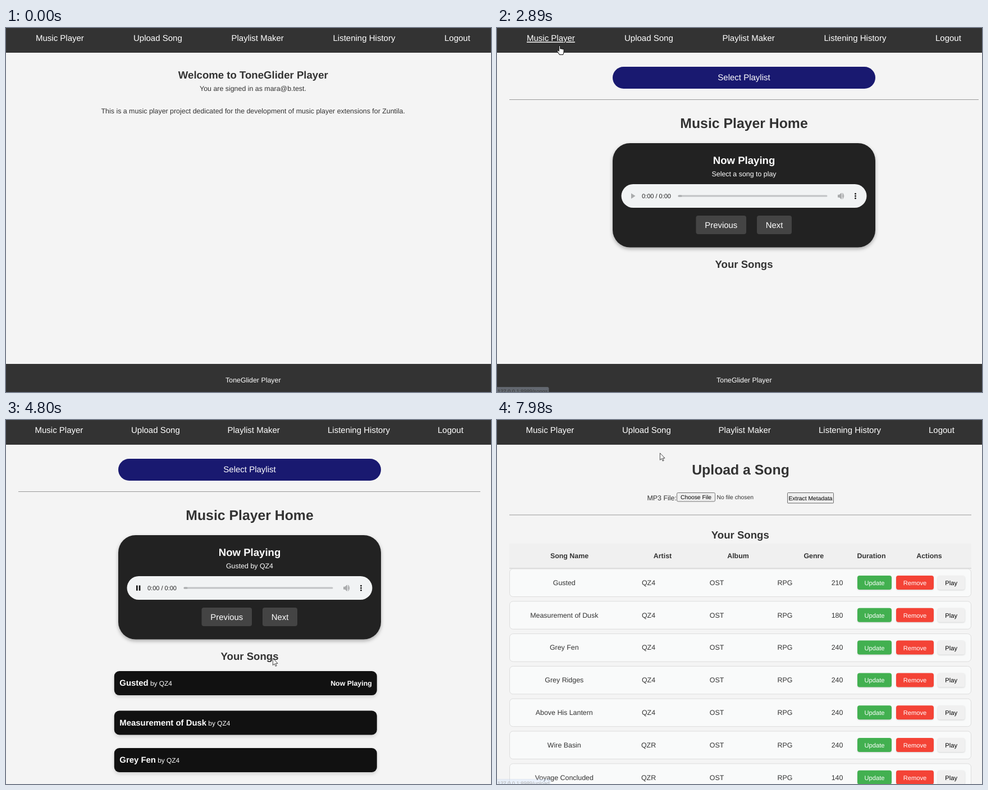
These frames come from a looping animation (864x648 px, 8000 ms). An HTML page:

```html
<!DOCTYPE html>
<html lang="en">
<head>
<meta charset="utf-8">
<title>Music player</title>
<style>
  html, body { margin: 0; width: 100%; height: 100%; overflow: hidden; background: #f4f4f4; }
  svg { display: block; width: 864px; height: 648px; font-family: "Liberation Sans", Arial, sans-serif; text-rendering: geometricPrecision; }
  .card { filter: drop-shadow(0 3px 3px rgba(0, 0, 0, .3)); }
  .tile rect { filter: drop-shadow(0 3px 3px rgba(0, 0, 0, .14)); }
  .menu { filter: drop-shadow(0 6px 6px rgba(0, 0, 0, .2)); }
  .soft { filter: drop-shadow(0 1px 1px rgba(0, 0, 0, .15)); }
  .on { text-decoration: underline; }
</style>
</head>
<body>
<svg id="stage" viewBox="0 0 864 648"></svg>
<script>
const LOOP = 8000;
const APP = 'ToneGlider Player';
const SONGS = [
  ['Gusted', 'QZ4', 210], ['Measurement of Dusk', 'QZ4', 180], ['Grey Fen', 'QZ4', 240],
  ['Grey Ridges', 'QZ4', 240], ['Above His Lantern', 'QZ4', 240],
  ['Wire Basin', 'QZR', 240], ['Voyage Concluded', 'QZR', 140]
];
const LINKS = ['Music Player', 'Upload Song', 'Playlist Maker', 'Listening History', 'Logout'];
const NAV_WIDE = [53, 227, 401.5, 582.5, 781];
const NAV_NARROW = [51.5, 223, 394.5, 573, 769];
const MENU = ['Now Playing: Music Player Home', 'Soft Drifts', 'The Copper Duke', 'Vorzak Combat Tunes'];
const ROW_H = 38.65;

// y is the middle of the capital letters
const text = (s, x, y, size, o = {}) =>
  `<text x="${x}" y="${y + size * .36}" font-size="${size}" text-anchor="${o.at || 'middle'}"` +
  ` fill="${o.fill || '#333'}"${o.bold ? ' font-weight="bold"' : ''}${o.id ? ` id="${o.id}"` : ''}>${s}</text>`;
const box = (x, y, w, h, fill, r = 0, more = '') =>
  `<rect x="${x}" y="${y}" width="${w}" height="${h}" rx="${r}" fill="${fill}" ${more}/>`;
const bold = { bold: 1 }, white = { fill: '#fff' };

const home = `<g id="home">
  ${text('Welcome to ' + APP, 440.3, 83.3, 18.6, bold)}
  ${text('You are signed in as mara@b.test.', 440, 108, 12.4)}
  ${text('This is a music player project dedicated for the development of music player extensions for Zuntila.', 440.2, 147.8, 12.4)}
</g>`;

const audio = `${box(15.5, 278, 437, 42, '#f1f3f4', 21)}
  <path id="play" d="M33 294.2V304L40.5 299.1Z" fill="#a9abac"/>
  <path id="pause" d="M32 294.5h2.6v9.3h-2.6zM36.8 294.5h2.6v9.3h-2.6z" fill="#111"/>
  ${text('', 52, 299.3, 11, { at: 'start', fill: '#222', id: 'clock' })}
  ${box(116.5, 297.5, 266, 3, '#c1c3c5', 1.5)}
  ${box(116.5, 297.5, 7, 3, '#a9abad', 1.5)}
  ${box(116.5, 297.5, 0, 3, '#555', 1.5, 'id="buffer"')}
  ${box(116.5, 297.5, 5, 3, '#111', 1.5, 'id="played"')}
  <g id="volume"><path d="M401.5 297.2h2.5l3.3-3.2v10.4l-3.3-3.2h-2.5z"/>
  <path d="M409 296.5q2 2.7 0 5.4M409.3 294q4.7 5.2 0 10.4" fill="none" stroke-width="1.3"/></g>
  ${[295.2, 299.2, 303.2].map(y => `<circle cx="432.5" cy="${y}" r="1.4" fill="#111"/>`).join('')}`;

const tile = ([name, artist], i) => `<g class="tile">
  ${box(0, 0, 468, 43, '#111', 9)}
  <text x="9.5" y="26" font-size="14.9" fill="#fff"><tspan font-weight="bold">${name}</tspan><tspan font-size="11.9"> by ${artist}</tspan></text>
  ${text('Now Playing', 459, 21.5, 12.4, { at: 'end', fill: '#fff', bold: 1, id: 'now' + i })}
</g>`;

const player = `<g id="player">
  ${box(22, 127, 823, 1, '#999', 0, 'id="rule"')}
  <g id="column">
    ${box(0, 69, 468, 39, '#191970', 19.5, 'id="select"')}
    ${text('Select Playlist', 234, 88, 15, white)}
    ${text('Music Player Home', 234, 168.7, 24.8, bold)}
    <g class="card">${box(0, 205, 468, 185.5, '#222', 31)}</g>
    ${text('Now Playing', 234, 235, 18.6, { bold: 1, fill: '#fff' })}
    ${text('', 234, 259.5, 12.4, { fill: '#fff', id: 'track' })}
    ${audio}
    ${box(148.5, 334, 89.5, 33, '#444', 4)}${text('Previous', 193.3, 350.3, 14.9, white)}
    ${box(257, 334, 62, 33, '#444', 4, 'id="next"')}${text('Next', 288, 350.3, 14.9, white)}
    ${text('Your Songs', 234, 420.7, 18.6, bold)}
  </g>
  <g id="list">${SONGS.slice(0, 3).map(tile).join('')}</g>
  <g id="menu" transform="translate(200 108)">
    <g class="menu">${box(0, 0, 468, ROW_H * 4, '#f9f9f9', 3)}</g>
    ${MENU.map((s, i) => box(0, i * ROW_H, 468, ROW_H, '#f9f9f9', i ? 0 : 4, 'class="item"') +
      text(s, 234, i * ROW_H + 19, 12.4, { fill: '#000' })).join('')}
  </g>
</g>`;

const row = ([name, artist, secs], i) => `<g transform="translate(0 ${i * 57.8})">
  ${box(22.5, 265, 822, 49.5, '#f9fafa', 6, 'stroke="#ddd"')}
  ${[[name, 119.8], [artist, 270], ['OST', 391.5], ['RPG', 513], [secs, 606]].map(([s, x]) => text(s, x, 289.3, 12.4)).join('')}
  <g class="soft">${box(642, 277, 61, 25, '#42b050', 4)}${box(711, 277, 67, 25, '#f44336', 4)}${box(785, 277, 48.5, 25, '#f0f0f0', 4)}</g>
  ${text('Update', 672.5, 290, 11.16, white)}${text('Remove', 744.5, 290, 11.16, white)}${text('Play', 809.2, 290, 11.16, { fill: '#000' })}
</g>`;

const heads = [['Song Name', 129], ['Artist', 295], ['Album', 429.5], ['Genre', 564.3], ['Duration', 667], ['Actions', 770]];
const upload = `<g id="upload">
  ${text('Upload a Song', 434, 88.3, 24.8, bold)}
  ${text('MP3 File:', 267.5, 138.8, 12.4, { at: 'start' })}
  ${box(320.5, 129.5, 68, 15.5, '#efefef', 2, 'stroke="#767676"')}${text('Choose File', 354.5, 137.3, 10.33, { fill: '#000' })}
  ${text('No file chosen', 391.5, 137.3, 10.33, { at: 'start' })}
  ${box(517.5, 129.5, 82, 18.5, '#efefef', 1, 'stroke="#6b6b6b"')}${text('Extract Metadata', 558.5, 138.8, 10.33, { fill: '#000' })}
  ${box(22, 168.5, 823, 1, '#999')}
  ${text('Your Songs', 433.3, 204.3, 18.6, bold)}
  ${box(22, 220, 823, 43.5, '#f0f0f0')}${box(22, 263, 823, 2, '#ddd')}
  ${heads.map(([s, x]) => text(s, x, 241.7, 12.4, bold)).join('')}
  ${SONGS.map(row).join('')}
</g>`;

const chrome = `${box(0, 0, 864, 44, '#333')}
  <g id="nav">${LINKS.map(s => text(s, 0, 18, 15, { at: 'start', fill: '#fff' })).join('')}</g>
  <g id="footer">${box(0, 598, 864, 50, '#333')}${text(APP, 440.3, 626.3, 12.4, white)}</g>
  <g id="status">${box(-2, 639.5, 0, 14, '#d3e3fd', 2, 'id="chip" stroke="#c3d0e4"')}
  ${text('', 1, 647, 9.3, { at: 'start', fill: '#444', id: 'url' })}</g>`;

const pointer = `<g id="pointer" fill="#fff" stroke="#111" stroke-linejoin="round">
  <path id="arrow" transform="scale(.775)" d="M.5 .5V16.5L4.2 13L6.7 18.7L9.2 17.6L6.7 12.2H11.7Z"/>
  <path id="hand" transform="scale(.775) translate(-6.5 0)" stroke-width="1.3" d="M5 2a1.5 1.5 0 0 1 3 0v6a1.4 1.4 0 0 1 2.8 .5a1.4 1.4 0 0 1 2.8 .6a1.3 1.3 0 0 1 2.6 .8v5q0 3-2 6.5H6.5L1 13.5q-1-2 1-2.3q1.5 0 3 2z"/>
</g>`;

document.getElementById('stage').innerHTML = home + player + upload + chrome + pointer;

const $ = id => document.getElementById(id);
const set = (el, name, value) => el.setAttribute(name, value);
const show = (id, yes) => set($(id), 'display', yes ? 'inline' : 'none');
const within = (t, a, b) => t >= a && t < b;
const ramp = (t, a, b) => Math.min(1, Math.max(0, (t - a) / (b - a)));

// time, x, y of the pointer
const PATH = [
  [110, 394, 640], [480, 293, 455], [850, 98.5, 46], [1120, -14, 0], [1320, -5, 0], [1380, -1.5, 0],
  [2110, -1.5, 0], [2520, 111.5, 31], [2900, 111.5, 31], [3200, 230, 85], [3430, 322, 182],
  [3530, 322, 182], [4000, 430, 465], [4260, 432, 468], [4520, 434, 468], [4800, 475, 424],
  [5270, 492, 362], [5480, 505, 356], [6300, 505, 356], [6800, 335, 107], [6930, 310, 69],
  [7030, 293.5, 42.5], [7160, 288, 31], [7400, 282, 25], [7700, 282, 25], [7970, 290, 58.5]
];
const HAND = [[2450, 2960], [3200, 3740], [3980, 4700], [5200, 6420], [6800, 6930], [7200, 7780]];

function pointerAt(t) {
  const i = PATH.findIndex(p => p[0] > t);
  if (i < 0) return PATH[PATH.length - 1].slice(1);
  if (!i) return PATH[0].slice(1);
  const [a, ax, ay] = PATH[i - 1], [b, bx, by] = PATH[i];
  const k = ramp(t, a, b);
  return [ax + (bx - ax) * k, ay + (by - ay) * k];
}

function drawPlayer(t, narrow, y) {
  const left = narrow ? 200 : 206;
  const open = within(t, 3200, 3740) || within(t, 6800, 6930);
  set($('column'), 'transform', `translate(${left} 0)`);
  set($('rule'), 'width', narrow ? 823 : 836);
  set($('select'), 'fill', open ? '#0b0b5e' : '#191970');
  set($('next'), 'fill', within(t, 5340, 6400) ? '#555' : '#444');

  const song = t < 4260 ? -1 : t < 5970 ? 0 : 1;
  const ready = within(t, 5270, 5970) || t >= 6160;
  const buffered = song === 1 ? 81.5 : t >= 5340 ? 140 : 0;
  $('track').textContent = song < 0 ? 'Select a song to play' : `${SONGS[song][0]} by ${SONGS[song][1]}`;
  $('clock').textContent = '0:00 / ' + (!ready ? '0:00' : song ? '4:28' : '2:58');
  show('play', song < 0);
  show('pause', song >= 0);
  show('played', ready);
  set($('buffer'), 'width', ready ? buffered : 0);
  set($('volume'), 'fill', ready ? '#111' : '#a9abac');
  set($('volume'), 'stroke', ready ? '#111' : '#a9abac');

  const x = 199.5 - 6.7 * ramp(t, 2950, 4600);
  const lift = 4 * (ramp(t, 3980, 4200) - ramp(t, 4800, 5050));
  show('list', narrow);
  document.querySelectorAll('.tile').forEach((el, i) => {
    set(el, 'transform', `translate(${x} ${451 + i * 66.5 - (i ? 0 : lift)})`);
    show('now' + i, i === song);
  });

  show('menu', open);
  const over = Math.floor((y - 108) / ROW_H);
  document.querySelectorAll('.item').forEach((el, i) =>
    set(el, 'fill', !i ? '#a6c6e6' : i === over ? '#ddd' : '#f9f9f9'));
}

function drawStatus(t) {
  const [page, width, alpha] =
    within(t, 2680, 3000) ? ['songs', 92, .3] :
    within(t, 3300, 3740) ? ['playlists/1', 110, 1] :
    t >= 7300 ? ['upload', 95, 1 - .6 * ramp(t, 7750, 7970)] : ['', 0, 0];
  show('status', alpha > 0);
  set($('status'), 'opacity', alpha);
  set($('chip'), 'width', width + 2);
  $('url').textContent = '127.0.0.1:8989/' + page;
}

function draw(t) {
  const narrow = t >= 2950;
  const [x, y] = pointerAt(t);
  show('home', t < 2680);
  show('player', within(t, 2680, 7710));
  show('upload', t >= 7710);
  show('footer', !narrow);
  const active = within(t, 2450, 2960) ? 0 : within(t, 7230, 7780) ? 1 : -1;
  [...$('nav').children].forEach((el, i) => {
    set(el, 'x', (narrow ? NAV_NARROW : NAV_WIDE)[i]);
    set(el, 'class', i === active ? 'on' : '');
  });
  drawPlayer(t, narrow, y);
  drawStatus(t);
  const hand = HAND.some(([a, b]) => within(t, a, b));
  show('pointer', t >= 110);
  show('hand', hand);
  show('arrow', !hand);
  set($('pointer'), 'transform', `translate(${x} ${y})`);
}

const start = performance.now();
function tick() {
  draw((performance.now() - start) % LOOP);
  requestAnimationFrame(tick);
}
tick();
</script>
</body>
</html>
```
